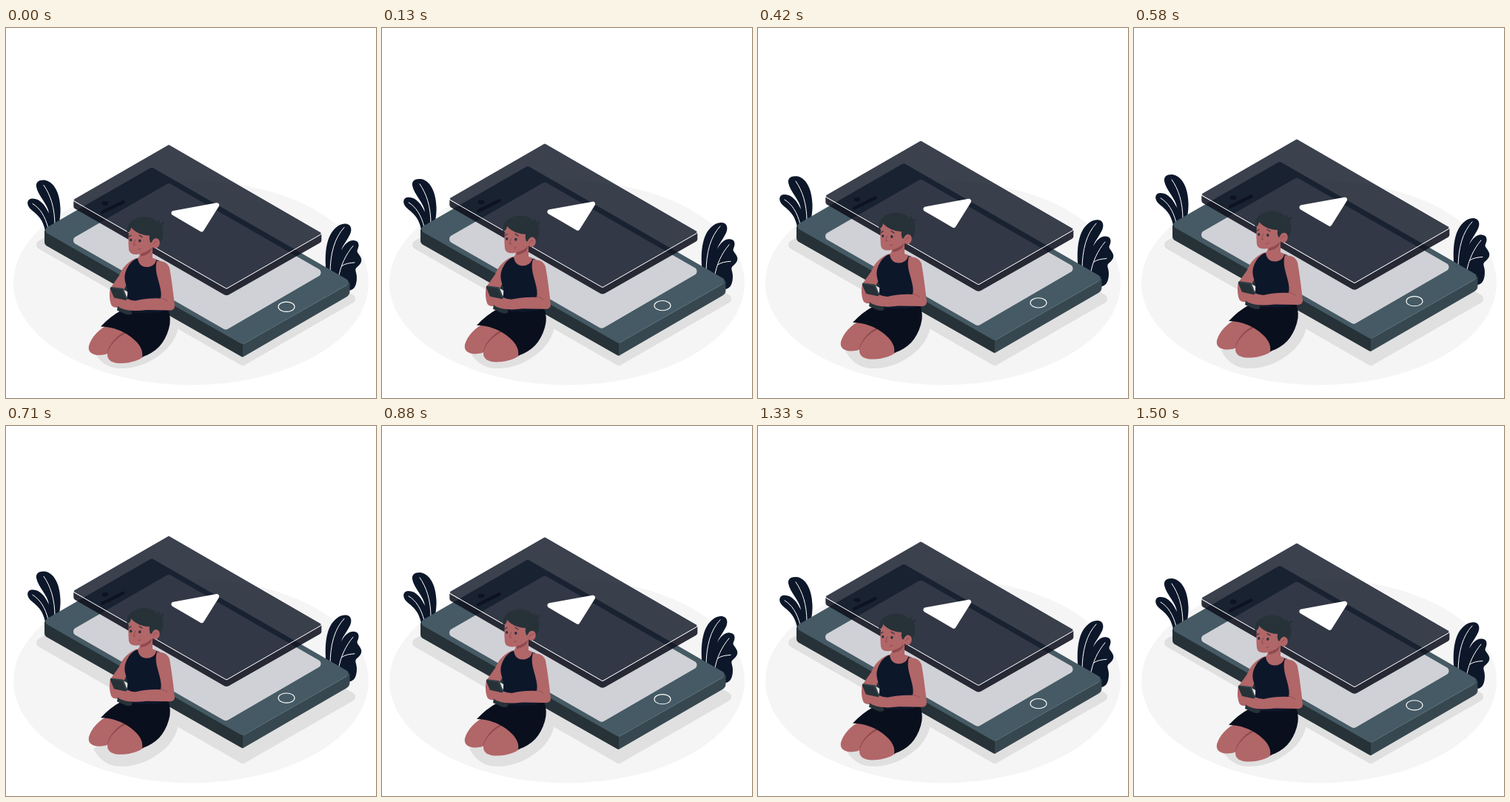
Animation, 500 px wide and 500 px high, one loop 1.54 s. Source, as an HTML page with a canvas:

```html
<!DOCTYPE html>
<html lang="en">
<head>
<meta charset="utf-8">
<title>Floating video player</title>
<style>
  html, body { margin: 0; width: 100%; height: 100%; overflow: hidden; background: #fff; }
  canvas { display: block; width: 500px; height: 500px; }
</style>
</head>
<body>
<canvas id="stage" width="500" height="500"></canvas>
<script>
const ctx = document.getElementById('stage').getContext('2d');

const LOOP = 1540, STEPS = 37, LIFT = 10;
const NAVY = '#0d172a', SKIN = '#b16668', SKIN_DARK = '#8f4a4e', HAIR = '#263238';

function fill(d, color) {
  ctx.fillStyle = color;
  ctx.fill(new Path2D(d));
}

function line(d, color, width = 1) {
  ctx.strokeStyle = color;
  ctx.lineWidth = width;
  ctx.lineCap = ctx.lineJoin = 'round';
  ctx.stroke(new Path2D(d));
}

function ellipse(x, y, rx, ry, angle = 0) {
  ctx.beginPath();
  ctx.ellipse(x, y, rx, ry, angle, 0, Math.PI * 2);
}

function oval(color, ...shape) {
  ellipse(...shape);
  ctx.fillStyle = color;
  ctx.fill();
}

function roundedPath(points, radius) {
  const [ax, ay] = points[points.length - 1], [bx, by] = points[0];
  ctx.beginPath();
  ctx.moveTo((ax + bx) / 2, (ay + by) / 2);
  points.forEach(([x, y], i) => {
    const [nx, ny] = points[(i + 1) % points.length];
    ctx.arcTo(x, y, nx, ny, radius);
  });
  ctx.closePath();
}

function rounded(points, radius, color) {
  roundedPath(points, radius);
  ctx.fillStyle = color;
  ctx.fill();
}

function drawGround() {
  oval('#f5f5f5', 250, 344.5, 240, 138);
  rounded([[35, 293], [197, 200], [478, 366], [320, 457]], 6, '#e0e0e0');
  fill('M118 436C126 452 140 461 158 460C184 459 202 448 217 434C229 422 234 407 233 396L222 384Z', '#e0e0e0');
}

function drawPlants() {
  fill('M54 280C51 258 42 253 33 245C27 239 28 231 36 231C46 231 53 240 58 251C57 239 43 227 41 215C40 208 46 205 54 206.5C67 210 73 227 73.5 244C74 257 71 265 70 280Z', NAVY);
  line('M36 238C46 244 53 255 57 271M51 213C60 226 66 243 66 267', '#fff');

  fill('M434 340C430 315 431 291 440 277C447 267 455 264 461 265.5C467 267 468 274 464 281C460 289 455 294 453 301C457 293 463 287 470 287.5C477 288 478 294 475 300C473 304 478 306 480 312C481.5 318 477 321 473 325C471 328 474 331 474 338C474 347 471 356 462 355Z', NAVY);
  line('M457 270C444 284 438 305 438 333M469 295C459 307 452 321 449 340M471 317.5C464 318 458 319 454 322', '#fff');
}

function drawPhone() {
  fill('M52 274V289.5Q52 293.5 56 295.5L318 444.5L320 445.2V424Z', '#263238');
  fill('M320 424L464.5 344V356.5Q464.5 361.5 460 364L320 445.2Z', '#37474f');
  rounded([[48.5, 274], [197, 188.5], [468, 344.5], [320, 428.5]], 5, '#455a64');
  line('M321 427.5L460 348', '#6c7e87', 0.6);
  rounded([[85.5, 287.5], [220, 210], [431, 331], [297, 408.8]], 5.5, '#d0d1d6');
  oval('#080d12', 134, 237.5, 4.5, 2.9);
  line('M130 249.5L158.5 235.5', '#080d12', 4.5);
  ellipse(379, 377.3, 11, 6.6);
  ctx.strokeStyle = '#fff';
  ctx.lineWidth = 1.1;
  ctx.stroke();
}

function drawGlass() {
  const face = [[89.5, 233], [220, 157.8], [428, 278], [298, 352.8]];
  fill('M91.3 234.5L298 353L426.3 279V288Q426 290 424 291L301 361Q298 362.5 295 361L93 244.5Q91.3 243.5 91.3 241Z', 'rgba(15,18,30,.88)');
  rounded(face, 2, 'rgba(15,22,38,.81)');
  roundedPath(face, 2);
  ctx.strokeStyle = '#fff';
  ctx.lineWidth = 1;
  ctx.stroke();
  rounded([[217.5, 249], [291.5, 235.5], [265.5, 277]], 3.2, '#fff');
}

function drawBody() {
  // Legs and skirt
  fill('M140 401C126 406 115 419 112 430C110 440 119 443 128 442.5Q134 442 139 440L164 413Z', SKIN);
  fill('M137 441C137 430 151 414 163 410L170 418C158 418 146 427 137 441Z', SKIN_DARK);
  fill('M162 413C149 419 138 431 137 442C137 451 146 454 157 453.5C169 453 179 450 187 444L183 425Z', SKIN);
  fill('M156 382Q184 388 219 380Q224 394 220 407C214 427 203 439 184 445C186 435 179 424 163 414C151 407 141 404.5 128 404Q141 390 156 382Z', '#090f1d');

  // Far arm, neck and top
  fill('M177 311C164 316 157 325 153 335L141 352C139 361 140 370 143 376Q148 380 153 377L154 364L163 347L170 324Z', SKIN);
  fill('M182 299L180 309L174 316L180 328H203L208 315L198 311L198 292Z', SKIN);
  fill('M182 304.5Q191 304 197 297Q197 306 182 309Z', SKIN_DARK);
  fill('M178 311.5C179 320 184 324 191 323.5C198 323 202 319 203 314L207 315L213 345L211 384Q182 388 156 382L163 366Q166 358 162 347C158 335 162 328 166 321Q171 314 178 311.5Z', NAVY);
}

function drawArmAndHandset() {
  fill('M151 376L168 382Q171 384 170 387Q166 389 161 387L150 382Z', HAIR);
  fill('M204 315Q218 315 221 325C224 341 226 359 228 376Q228 382 221 382L190 381.5C176 383.5 162 383 153 378Q147 374 151 369L154 363Q158 362 163 366Q169 369 175 369Q193 365 209 366C212 356 204 339 203 329Q202 321 204 315Z', SKIN);
  line('M209 365Q214 366 218 369', SKIN_DARK, 0.8);
  rounded([[139.5, 350], [158.5, 352.5], [165, 369], [146, 365]], 2, HAIR);
  line('M142 351L157 353.5L163 366.5', '#455a64', 0.7);
  fill('M141 364Q146 364 149 369L150 376Q145 378 142 374Z', SKIN);
}

function drawHead() {
  fill('M168 267C165 277 165 290 166 300Q167 307 177 306.5C187 305 197 300 199 290L197 273Z', SKIN);
  fill('M164 278C161 266 171 256 186 255.7C195 255.5 202 259 205 264C205 261 206 260 208 260C207 263 208 264 209 265C211 263 213 262 214 265C212 266 211 267 211 269C214 278 212 288 207 292L199 287Q198 291 195 290.5Q193 286 194 281C185 281 175 277 169 270Q169 274 164 278Z', HAIR);
  oval(SKIN, 202.3, 291.5, 5.4, 6.8, 0.25);
  line('M199 293Q201 289 204 289', SKIN_DARK, 0.8);
  oval(HAIR, 168.7, 287, 1.6, 1.9);
  oval(HAIR, 180.8, 288, 1.7, 2);
  line('M166 282.5L169 280.5M180 280.5L184 283', HAIR, 1.1);
  line('M174.5 287L172.5 293.5L175 294', SKIN_DARK, 1);
  line('M178.5 299.5Q180.5 300 182 298.5', SKIN_DARK, 1);
}

function draw(time) {
  const step = Math.floor((time % LOOP + 4) / (LOOP / STEPS)) % STEPS;
  const phase = (step + 1) / STEPS;
  const rise = LIFT * (1 - Math.abs(1 - 2 * phase));

  ctx.clearRect(0, 0, 500, 500);
  drawGround();
  ctx.save();
  ctx.translate(0, -rise);
  drawPlants();
  drawPhone();
  drawGlass();
  drawBody();
  drawArmAndHandset();
  drawHead();
  ctx.restore();
}

const start = performance.now();
function tick() {
  draw(performance.now() - start);
  requestAnimationFrame(tick);
}
tick();
</script>
</body>
</html>
```
